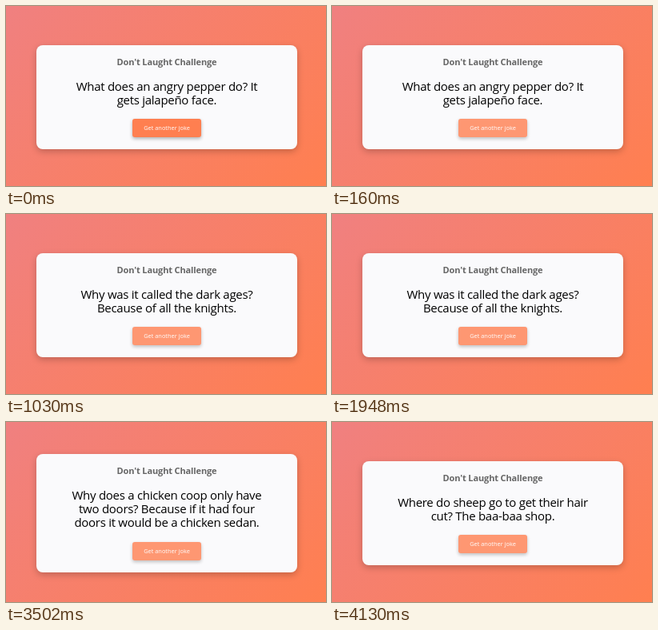
These frames come from a looping animation (400x225 px, 4460 ms). An HTML page:

```html
<!DOCTYPE html>
<html lang="en">
<head>
<meta charset="utf-8">
<title>Joke card</title>
<style>
  html, body { margin: 0; width: 100%; height: 100%; overflow: hidden; }
  body {
    position: relative;
    background: linear-gradient(135deg, #f08080, #ff7f50);
    font-family: "Open Sans", "Noto Sans", sans-serif;
    text-align: center;
  }
  .card, h1, p, .button { position: absolute; margin: 0; }
  .card, p, .button { animation: 4460ms step-end infinite; }
  .card {
    left: 38px; top: 49px; width: 326px; height: 130px;
    border-radius: 8px;
    background: #fafafc;
    box-shadow: 0 3px 8px rgba(0, 0, 0, .22);
    animation-name: grow;
  }
  h1 {
    left: 0; right: 0; top: 13px;
    font-size: 11px; font-weight: 700; line-height: 15px;
    letter-spacing: -.13px;
    color: #666;
  }
  p {
    left: 0; right: 0; top: 42.5px;
    font-size: 15px; line-height: 17.25px;
    letter-spacing: -.28px;
    white-space: nowrap;
    color: #000;
    visibility: hidden;
  }
  .button {
    left: 120px; bottom: 15px; width: 86px; height: 23px;
    border-radius: 3px;
    background: #ff7f50;
    box-shadow: 0 2px 4px rgba(0, 0, 0, .3);
    font-size: 7.4px; font-weight: 500; line-height: 23px;
    color: #fff;
    animation-name: hover;
  }
  .pepper { animation-name: pepper; }
  .knights { animation-name: knights; }
  .chicken { animation-name: chicken; }
  .sheep { animation-name: sheep; }

  /* Changes at 160, 1030, 2560 and 4130 ms */
  @keyframes hover { 0% { opacity: 1; } 3.5874%, 100% { opacity: .8; } }
  @keyframes grow {
    0%, 92.6009%, 100% { top: 49px; height: 130px; }
    57.3991% { top: 40.2px; height: 147.5px; }
  }
  @keyframes pepper {
    0% { visibility: visible; }
    23.0942%, 100% { visibility: hidden; }
  }
  @keyframes knights {
    0%, 57.3991%, 100% { visibility: hidden; }
    23.0942% { visibility: visible; }
  }
  @keyframes chicken {
    0%, 92.6009%, 100% { visibility: hidden; }
    57.3991% { visibility: visible; }
  }
  @keyframes sheep {
    0% { visibility: hidden; }
    92.6009%, 100% { visibility: visible; }
  }
</style>
</head>
<body>
  <div class="card">
    <h1>Don't Laught Challenge</h1>
    <p class="pepper">What does an angry pepper do? It<br>gets jalapeño face.</p>
    <p class="knights">Why was it called the dark ages?<br>Because of all the knights.</p>
    <p class="chicken">Why does a chicken coop only have<br>two doors? Because if it had four<br>doors it would be a chicken sedan.</p>
    <p class="sheep">Where do sheep go to get their hair<br>cut? The baa-baa shop.</p>
    <div class="button">Get another joke</div>
  </div>
</body>
</html>
```
